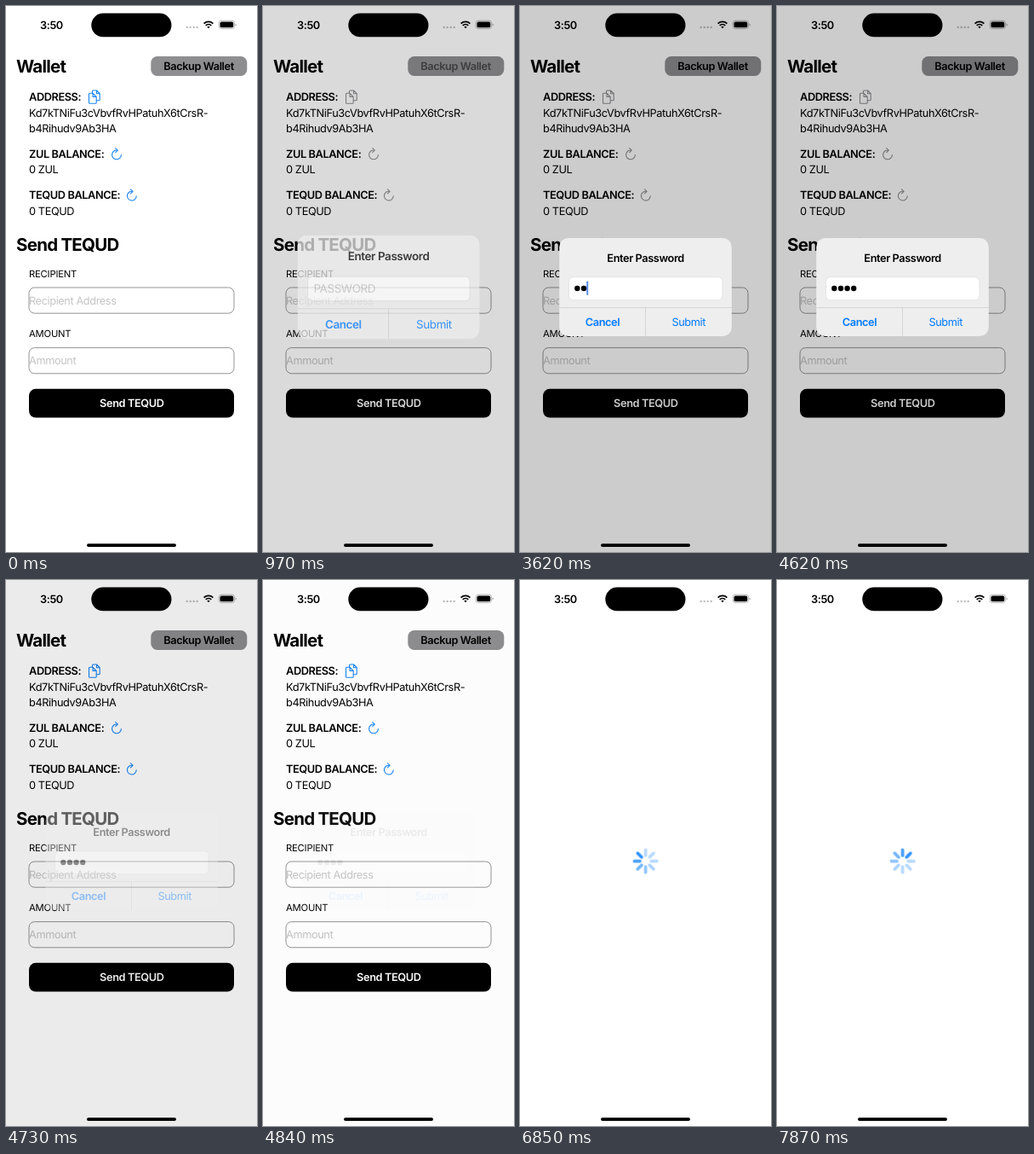
Recreate the animation shown at these times as an HTML page. Size 295 by 640 pixels, loop 8000 ms.

```html
<!DOCTYPE html>
<html lang="en">
<head>
<meta charset="utf-8">
<title>Wallet backup</title>
<style>
  html, body { margin: 0; width: 100%; height: 100%; overflow: hidden; background: #fff; }
  svg { display: block; width: 295px; height: 640px; }
  text {
    font: 400 12.75px Inter, "Liberation Sans", sans-serif;
    font-optical-sizing: none;
    letter-spacing: -.4px;
    text-rendering: geometricPrecision;
  }
  .semi { font-weight: 600; }
  .title { font-size: 20.5px; font-weight: 700; letter-spacing: -.75px; }
  .small { font-size: 11.25px; letter-spacing: -.2px; }
  .mid { text-anchor: middle; }
  .hint { fill: #c4c4c6; }
  .blue { fill: #007aff; }
  .line { fill: none; stroke-linecap: round; stroke-linejoin: round; }
  .box { fill: #fff; stroke: #949496; }

  /* One 8 s timeline; poses are held between changes. */
  .wallet, .press, .icons, .show, .zoom, .caret, .move, .empty, .two, .three, .four, .loader {
    animation: 8s step-end infinite;
  }
  .wallet { animation-name: leave; }
  .press { animation-name: press; }
  .icons { animation-name: tint; stroke: #1484f5; stroke-width: 1.1; }
  .show { animation-name: show; opacity: 0; }
  .zoom { animation-name: zoom; transform-origin: 147.5px 329.5px; }
  .caret { animation-name: blink; opacity: 0; }
  .move { animation-name: move; }
  .empty { animation-name: clear; }
  .two { animation-name: two; }
  .three { animation-name: three; }
  .four { animation-name: four; }
  .loader { animation-name: load; }
  .spin { animation: spin 8s linear infinite; transform-origin: 147.6px 329.6px; }

  @keyframes press {
    0% { opacity: 1; }
    6.25% { opacity: .25; }
    10.625% { opacity: .3; }
    12.125% { opacity: .5; }
    13.375% { opacity: .75; }
    14.875%, 100% { opacity: 1; }
  }
  @keyframes show {
    0% { opacity: 0; }
    10.625% { opacity: .2; }
    12.125% { opacity: .73; }
    13.375% { opacity: .91; }
    14.875% { opacity: .98; }
    16.125% { opacity: 1; }
    59.125% { opacity: .4; }
    60.5% { opacity: .07; }
    61.875%, 100% { opacity: 0; }
  }
  @keyframes zoom {
    0%, 10.625% { transform: scale(1.16); }
    12.125% { transform: scale(1.055); }
    13.375% { transform: scale(1.018); }
    14.875% { transform: scale(1.004); }
    16.125%, 100% { transform: none; }
  }
  @keyframes tint {
    0% { stroke: #1484f5; }
    10.625% { stroke: #8e8e93; }
    59.125%, 100% { stroke: #1484f5; }
  }
  @keyframes blink {
    0% { opacity: 0; }
    14.875% { opacity: 1; }
    24.125% { opacity: 0; }
    30.875% { opacity: .9; }
    32.375% { opacity: 1; }
    35.375% { opacity: .35; }
    36.875% { opacity: 0; }
    42.875% { opacity: 1; }
    56.25%, 100% { opacity: 0; }
  }
  @keyframes move {
    0% { transform: none; }
    45.25% { transform: translateX(15.2px); }
    48.625% { transform: translateX(22.8px); }
    52%, 100% { transform: translateX(30.6px); }
  }
  @keyframes clear { 0% { opacity: 1; } 45.25%, 100% { opacity: 0; } }
  @keyframes two { 0% { opacity: 0; } 45.25%, 100% { opacity: 1; } }
  @keyframes three { 0% { opacity: 0; } 48.625%, 100% { opacity: 1; } }
  @keyframes four { 0% { opacity: 0; } 52%, 100% { opacity: 1; } }
  @keyframes leave { 0% { opacity: 1; } 64.75% { opacity: .5; } 66.25%, 100% { opacity: 0; } }
  @keyframes load { 0% { opacity: 0; } 68%, 100% { opacity: 1; } }
  @keyframes spin {
    0% { transform: rotate(0deg); }
    68% { transform: rotate(0deg); animation-timing-function: steps(25, end); }
    100% { transform: rotate(1125deg); }
  }
</style>
</head>
<body>
<svg viewBox="0 0 295 640">
  <defs>
    <path id="reload" class="line" d="M5.4 .5A5.4 5.4 0 1 1 1-4.9M-1.3-7.3 1.3-4.9-1.3-2.3"/>
    <path id="spoke" d="M147.6 316.5v6.4"/>
  </defs>
  <rect width="295" height="640" fill="#fff"/>

  <!-- Status bar -->
  <text class="semi" x="40" y="26.6">3:50</text>
  <g fill="#bdbdbf">
    <circle cx="212.7" cy="25" r="1.2"/>
    <circle cx="216.7" cy="25" r="1.2"/>
    <circle cx="220.7" cy="25" r="1.2"/>
    <circle cx="224.7" cy="25" r="1.2"/>
  </g>
  <path d="M232.6 20.6a7.7 7.7 0 0 1 10.8 0M234.7 22.9a4.7 4.7 0 0 1 6.6 0" fill="none" stroke="#000" stroke-width="1.7"/>
  <path d="M236.3 24.5a2.5 2.5 0 0 1 3.4 0L238 26.3z"/>
  <rect x="250.2" y="17.2" width="18.4" height="9.4" rx="3" fill="none" stroke="#a6a6a8" stroke-width=".8"/>
  <rect x="251.5" y="18.5" width="15.8" height="6.8" rx="1.9"/>
  <path d="M269.6 20.4q1.2 .4 1.2 1.5t-1.2 1.5z" fill="#a6a6a8"/>

  <!-- Wallet page -->
  <g class="wallet">
    <text class="title" x="12" y="77.7">Wallet</text>
    <rect x="170.3" y="59" width="113" height="23" rx="7.5" fill="#8e8e90"/>
    <text class="semi mid press" x="226.5" y="75.2">Backup Wallet</text>

    <text class="semi" x="27" y="111">ADDRESS:</text>
    <text x="27" y="129.6">Kd7kTNiFu3cVbvfRvHPatuhX6tCrsR-</text>
    <text x="27" y="147.6">b4Rihudv9Ab3HA</text>
    <text class="semi" x="27" y="178">ZUL BALANCE:</text>
    <text x="27" y="196">0 ZUL</text>
    <text class="semi" x="27" y="226.2">TEQUD BALANCE:</text>
    <text x="27" y="244.6">0 TEQUD</text>
    <g class="icons">
      <path class="line" d="M101.5 102v-2a1 1 0 0 1 1-1h4l3.7 3.7v7a1 1 0 0 1-1 1h-2.8M106.5 99v3.7h3.7"/>
      <path class="line" d="M98.5 102.3h3.6l4.1 4.1v6.9a1 1 0 0 1-1 1h-6.7a1 1 0 0 1-1-1v-10a1 1 0 0 1 1-1zM102.1 102.3v4.1h4.1"/>
      <use href="#reload" x="130" y="174"/>
      <use href="#reload" x="147.8" y="222.2"/>
    </g>

    <text class="title" x="12" y="287">Send TEQUD</text>
    <text class="small" x="27" y="318">RECIPIENT</text>
    <rect class="box" x="27" y="330" width="241" height="30.2" rx="6.5"/>
    <text class="hint" x="27" y="349.8">Recipient Address</text>
    <text class="small" x="27" y="388.4">AMOUNT</text>
    <rect class="box" x="27" y="400.6" width="241" height="30.2" rx="6.5"/>
    <text class="hint" x="27" y="420.3">Ammount</text>
    <rect x="27" y="448.8" width="241" height="33.7" rx="8"/>
    <text class="semi mid" x="147.8" y="470.2" fill="#fff">Send TEQUD</text>
  </g>

  <!-- Loading spinner -->
  <g class="loader">
    <g class="spin" stroke="#007aff" stroke-width="3.8" stroke-linecap="round">
      <use href="#spoke" transform="rotate(90 147.6 329.6)" opacity=".82"/>
      <use href="#spoke" transform="rotate(45 147.6 329.6)" opacity=".7"/>
      <use href="#spoke" transform="rotate(0 147.6 329.6)" opacity=".55"/>
      <use href="#spoke" transform="rotate(-45 147.6 329.6)" opacity=".43"/>
      <use href="#spoke" transform="rotate(-90 147.6 329.6)" opacity=".33"/>
      <use href="#spoke" transform="rotate(-135 147.6 329.6)" opacity=".28"/>
      <use href="#spoke" transform="rotate(180 147.6 329.6)" opacity=".28"/>
      <use href="#spoke" transform="rotate(135 147.6 329.6)" opacity=".28"/>
    </g>
  </g>

  <!-- Password alert -->
  <g class="show"><rect width="295" height="640" opacity=".2"/></g>
  <g class="show">
    <g class="zoom">
      <rect x="46.2" y="272" width="202.6" height="115" rx="10.5" fill="#eee"/>
      <text class="semi mid" x="147.6" y="299.5">Enter Password</text>
      <rect x="57.5" y="317.8" width="180.5" height="27" rx="5" fill="#fff" stroke="#dcdcde" stroke-width=".7"/>
      <text class="hint empty" x="64" y="335.7">PASSWORD</text>
      <g class="two"><circle cx="67.3" cy="331" r="3.2"/><circle cx="75" cy="331" r="3.2"/></g>
      <circle class="three" cx="82.6" cy="331" r="3.2"/>
      <circle class="four" cx="90.2" cy="331" r="3.2"/>
      <g class="caret"><rect class="move" x="63.2" y="322.5" width="1.6" height="16.5" rx=".8" fill="#2f6fe8"/></g>
      <path d="M46.2 353.5h202.6M147.5 353.5V387" stroke="#cacacc" stroke-width=".7"/>
      <text class="semi mid blue" x="97" y="375.2">Cancel</text>
      <text class="mid blue" x="198.2" y="375.2">Submit</text>
    </g>
  </g>

  <!-- Hardware cutout and home bar -->
  <rect x="100.3" y="8.6" width="94.2" height="27.6" rx="13.8"/>
  <rect x="95" y="630.2" width="105" height="3.8" rx="1.9"/>
</svg>
</body>
</html>
```
